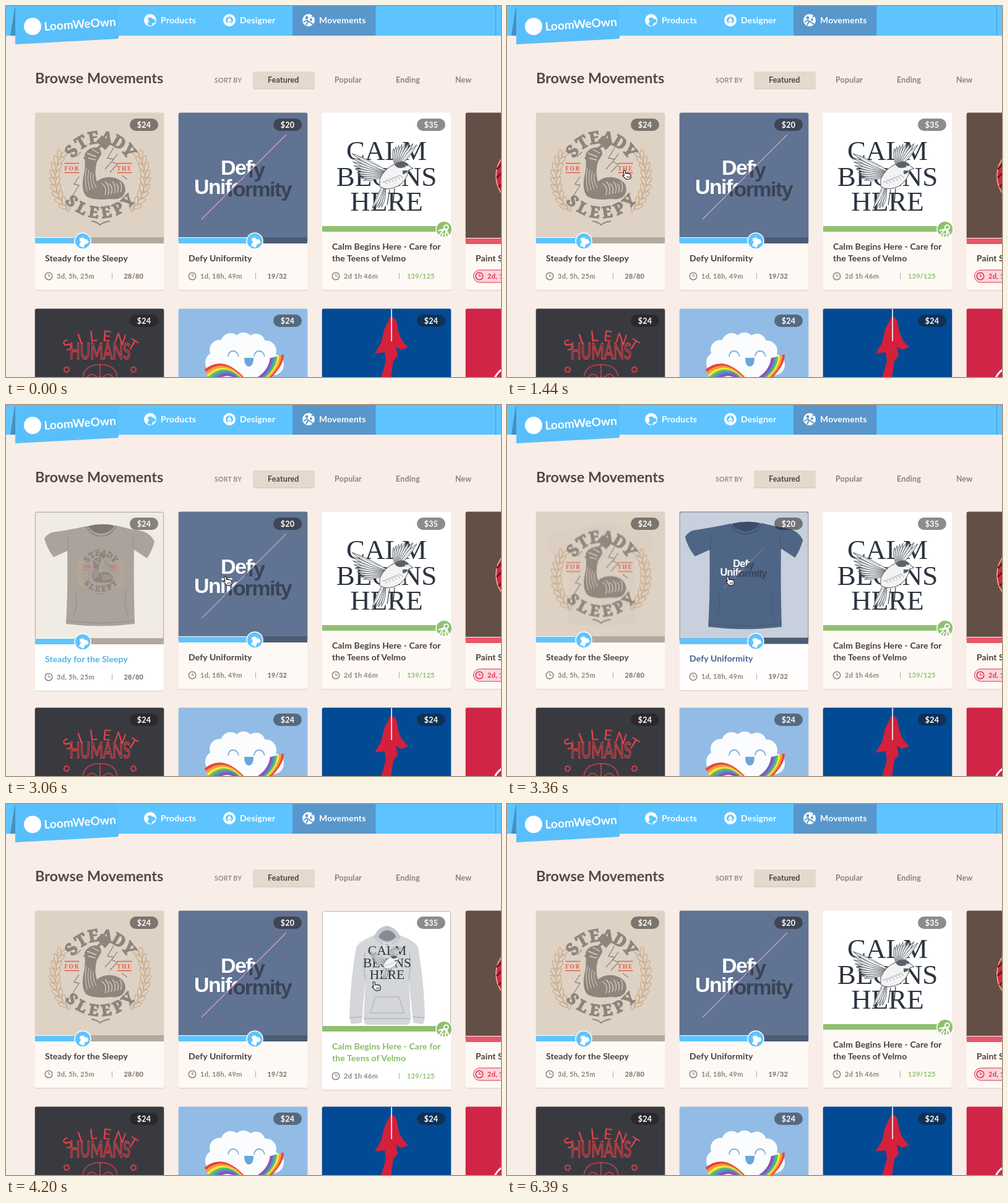
Write an HTML page that moves like this. It is 800 by 600 pixels and loops after 6.42 s.

```html
<!DOCTYPE html>
<html lang="en">
<head>
<meta charset="utf-8">
<title>Browse Movements</title>
<style>
html, body { margin: 0; width: 100%; height: 100%; overflow: hidden; background: #f8ede7; }
svg { display: block; width: 100vw; height: 100vh; }
text { font-family: Lato, "Open Sans", sans-serif; font-weight: 700; }
.sans { font-family: "Liberation Sans", sans-serif; }
.serif { font-family: "Liberation Serif", serif; font-weight: 400; }
.slab { font-family: "Noto Serif", serif; font-weight: 900; }
.thin { font-weight: 400; }
</style>
</head>
<body>
<svg id="stage" viewBox="0 0 800 600"></svg>
<script>
const LOOP = 6420;
const SHRINK = 0.52;
const SKY = '#5ec4ff';
const TAB = '#5897cb';
const GREEN = '#8fc06f';
const RED = '#dd3350';

// ---------- markup helpers ----------
const text = (x, y, str, size, fill, more = '') =>
  `<text x="${x}" y="${y}" font-size="${size}" ${fill ? `fill="${fill}"` : ''} ${more}>${str}</text>`;
const rect = (x, y, w, h, fill, more = '') =>
  `<rect x="${x}" y="${y}" width="${w}" height="${h}" fill="${fill}" ${more}/>`;
const disc = (x, y, r, fill, more = '') =>
  `<circle cx="${x}" cy="${y}" r="${r}" fill="${fill}" ${more}/>`;
const shape = (d, fill, more = '') => `<path d="${d}" fill="${fill}" ${more}/>`;
const line = (d, stroke, w = 1, more = '') =>
  `<path d="${d}" fill="none" stroke="${stroke}" stroke-width="${w}" ${more}/>`;
const at = (x, y, inner, more = '') =>
  `<g transform="translate(${x} ${y}) ${more}">${inner}</g>`;
const repeat = (n, fn) => Array.from({ length: n }, (_, i) => fn(i)).join('');
const tile = (x, y, h, fill) => rect(x - 0.3, y, 208.6, h, fill, 'rx="3"');

// letters along an arc; angles are degrees from the top, or from the bottom when dir is -1
function arcText(str, cx, cy, r, from, step, dir, size, fill, more) {
  return [...str].map((ch, i) => {
    const a = from + i * step, rad = a * Math.PI / 180;
    const x = cx + r * Math.sin(rad), y = cy - dir * r * Math.cos(rad);
    return at(x.toFixed(1), y.toFixed(1),
      text(0, size * 0.36, ch, size, fill, 'text-anchor="middle" ' + more), `rotate(${a * dir})`);
  }).join('');
}

// ---------- icons ----------
const teeIcon = fill => shape('M-7-3L-3-6Q0-4 3-6L7-3L5 1L3.5 0V7H-3.5V0L-5 1Z', fill);
const personIcon = fill => disc(0, -5, 3, 'none', `stroke="${fill}" stroke-width="1.8"`) +
  line('M-8 4L-2-1H3L8 4M-2 0L-4 9M2 0L5 9M0 4V9', fill, 2);

function clock(x, y, color) {
  return disc(x, y, 5.8, 'none', `stroke="${color}" stroke-width="1.5"`) +
    line(`M${x} ${y - 3.5}V${y}H${x + 3}`, color, 1.2);
}

function pill(x, y, price) {
  return rect(x + 153, y, 46, 20, 'rgba(30,25,25,.5)', 'rx="10"') +
    text(x + 176, y + 14.5, price, 12.5, '#fff', 'text-anchor="middle" letter-spacing=".2"');
}

// ---------- header ----------
function header() {
  const nav = (x, label) => text(x, 28, label, 14, '#fff', 'letter-spacing=".2"');
  return rect(0, 0, 800, 48, SKY) + rect(463, 0, 134.5, 48, TAB) +
    rect(791, 0, 1, 48, '#459bd0') +
    shape('M7 48L14 2H17V48Z', '#4391c3') +
    shape('M15 0H181V53L15 62Z', '#59bffa') +
    shape('M181 48H182L181 53Z', '#4391c3') +
    disc(43, 33, 14, '#fff') +
    text(62, 40, 'LoomWeOwn', 19, '#fff', 'transform="rotate(-4 62 40)"') +
    disc(233, 23, 10, '#fff') + at(234.5, 25, teeIcon(SKY), 'rotate(25)') + nav(250, 'Products') +
    disc(361, 23, 10, '#fff') + disc(361, 23, 6, SKY) +
    shape('M361 18L365 25H357ZM358 26H364V29H358Z', '#fff') + nav(378, 'Designer') +
    disc(489, 23, 10, '#fff') + disc(486, 19, 2.4, TAB) + disc(493, 22, 2, TAB) +
    line('M481 26L486 23L497 30M485 31L488 25M494 18L497 15', TAB, 2) + nav(506, 'Movements');
}

function toolbar() {
  const tab = (x, label, fill) => text(x, 124, label, 12.5, fill, 'letter-spacing=".15"');
  return text(47, 124.5, 'Browse Movements', 23.4, '#544744') +
    text(337, 124, 'SORT BY', 10.5, '#978b84', 'letter-spacing=".2"') +
    rect(399, 106, 100, 28.5, '#cdc3b7', 'rx="3"') + rect(399, 106, 100, 27.5, '#e3d9cd', 'rx="3"') +
    tab(423, 'Featured', '#4f4340') + tab(531, 'Popular', '#8e827b') +
    tab(630, 'Ending', '#8e827b') + tab(726, 'New', '#8e827b');
}

// ---------- printed designs ----------
function armArt() {
  const ink = '#8f857c', paper = '#ded2c5', wheat = '#c8aa88', red = '#e0604c';
  const heavy = `class="slab" stroke="${ink}" stroke-width="1.6"`;
  const ear = s => repeat(9, i => {
    const a = (-32 + i * 9) * Math.PI / 180;
    const x = 152 + s * 73 * Math.cos(a), y = 278 + 73 * Math.sin(a);
    return [-24, 34].map(tilt =>
      `<ellipse rx="3" ry="7.5" fill="none" stroke="${wheat}" stroke-width="1.3" transform="translate(${
        (x + (tilt > 0 ? s * 4 : -s * 4)).toFixed(1)} ${y.toFixed(1)}) rotate(${s * (tilt + a * 50)})"/>`).join('');
  });
  const sign = (x, str) => text(x, 265.5, str, 9.5, red,
      'class="slab" text-anchor="middle" letter-spacing="1.5"') +
    line(`M${x - 12} 254.5h24M${x - 12} 269.5h24`, red, 1.4);
  return ear(1) + ear(-1) +
    arcText('STEADY', 152, 272, 60, -51, 20.4, 1, 27, ink, heavy) +
    arcText('SLEEPY', 152, 270, 64, -45, 18, -1, 25, ink, heavy) +
    sign(106.5, 'FOR') + sign(191.5, 'THE') +
    line('M126 247L156 224', ink, 4) +
    shape('M146 219L155 209L169 223L160 233Z', ink) +
    shape('M127 240Q130 232 141 229Q154 227 154 240L147 252Q142 270 147 284Q158 274 176 278Q193 283 193 298Q190 315 168 312Q142 315 130 308Q121 298 125 276Q129 262 127 240Z', ink) +
    line('M131 238L146 244M133 246L145 249M139 232L150 238', paper, 1.4) +
    repeat(4, i => line(`M${130 + i * 4} ${262 + i * 3}Q${126 + i * 4} 280 ${131 + i * 5} ${300 - i * 2}`, paper, 1)) +
    repeat(6, i => line(`M${154 + i * 6} ${287 - (i % 2) * 3}Q${164 + i * 5} 292 ${160 + i * 5} ${306 - i}`, paper, 1.2)) +
    line('M174 229L164 246L174 248L160 264M180 239L171 252L180 256L168 269M118 276L110 288L118 290L108 306M187 274L196 280M113 244L121 236', ink, 1.3) +
    line('M138 348Q147 349 152 354Q158 349 168 348', ink, 2);
}

function sliceArt() {
  const words = fill => text(347, 273, 'Defy', 34, fill, 'class="sans" letter-spacing="-1.6"') +
    text(304, 304, 'Uniformity', 34, fill, 'class="sans" letter-spacing="-1.6"');
  return `<g clip-path="url(#cutLeft)">${words('#fff')}</g>` +
    `<g clip-path="url(#cutRight)">${at(3, 4, words('#3a4355'))}</g>` +
    line('M316 345L453 208', '#dc9fc6', 1.2);
}

function birdArt() {
  const ink = '#2c3540';
  const word = (y, str) => text(615, y, str, 45, ink, 'class="serif" text-anchor="middle"');
  const fan = (x, y, n, a0, step, len, grow) => repeat(n, i => {
    const l = len + i * grow;
    return at(x, y, shape(`M0 0Q${l * 0.6}-7 ${l} 0Q${l * 0.6} 4 0 0Z`, '#f6f6f6',
      'stroke="#555c65" stroke-width=".9"') + line(`M${l * 0.3} 0H${l * 0.85}`, '#8d939a', 0.7),
      `rotate(${a0 + i * step})`);
  });
  return word(249, 'CALM') + word(291, 'BEGINS') + word(331, 'HERE') +
    fan(613, 284, 4, 98, 6, 42, 2) +
    fan(632, 264, 8, -100, 7, 34, 2.4) +
    fan(622, 270, 9, 165, 5.2, 46, 3) +
    shape('M604 280Q612 262 630 255Q644 247 652 259L658 263L651 265Q648 282 634 291Q616 300 604 292Z', '#f3f3f3',
      'stroke="#4b525b" stroke-width="1"') +
    shape('M628 257Q640 246 651 257Q642 264 632 261Z', '#59616a') + disc(646, 259, 1.1, '#fff') +
    shape('M641 266L650 266Q647 272 641 272Z', '#59616a') +
    repeat(6, i => line(`M${608 + i * 5} ${285 - i * 2}q5-3 8 3`, '#8d939a', 0.9)) +
    line('M620 297L616 322M628 295L626 318', ink, 1.2);
}

// ---------- garments ----------
function tee(fill, shade) {
  return shape('M130 196Q98 203 74 206Q66 209 62 216Q66 232 77 246L99 236Q100 300 97 354Q153 361 208 354Q206 290 207 234L228 248Q236 236 240 221Q233 206 216 203Q196 200 178 195Q154 209 130 196Z', fill) +
    shape('M132 196Q154 190 176 195Q166 208 153 208Q140 207 132 196Z', shade) +
    line('M130 196Q137 212 154 212Q171 211 178 195', shade, 1.2) +
    line('M99 236Q102 222 100 212M207 234Q204 222 206 212M109 342Q118 320 112 300M198 344Q188 318 196 296M97 349Q153 356 208 349', shade, 1, 'opacity=".55"');
}

function hoodie() {
  const seam = '#a5a9b0';
  return shape('M596 212Q570 222 566 232Q556 290 555 345L558 356L575 354Q577 320 581 285L578 345Q578 357 584 357H648Q655 356 654 345L651 285Q655 320 658 354L674 356L677 345Q676 290 666 232Q662 222 636 212Q630 200 616 197Q602 199 596 212Z', '#d4d6d9') +
    shape('M595 214Q602 199 616 197Q630 200 637 214Q628 222 616 224Q604 222 595 214Z', '#c2c5ca') +
    shape('M602 215Q606 205 616 204Q627 205 630 215Q623 222 616 222Q608 221 602 215Z', '#858a94') +
    line('M595 215Q604 227 616 228Q628 227 637 215M581 285Q577 260 580 240M651 285Q655 260 652 240', seam) +
    line('M597 312H635L643 338H589ZM578 347H654M556 346L576 344M657 344L676 346', seam) +
    line('M611 224V240M621 224V238', '#eceef0', 1.5);
}

// ---------- cards ----------
const cards = [
  { x: 47, price: '$24', bg: '#ded2c5', lit: '#f0ece4', bar: 375, done: 63, knob: 77, color: SKY, icon: teeIcon,
    hot: [80, 180, 228], title: ['Steady for the Sleepy'], left: '3d, 5h, 25m', count: '28/80', countX: 143.5,
    art: armArt, cx: 152, cy: 275, dx: 1, dy: -6, wear: () => tee('#aaa39c', '#7f7872') },
  { x: 279, price: '$20', bg: '#607392', lit: '#e3e9f0', bar: 375, done: 110, knob: 123, color: SKY, icon: teeIcon,
    hot: [66, 98, 146], title: ['Defy Uniformity'], left: '1d, 18h, 49m', count: '19/32', countX: 143.5,
    art: sliceArt, cx: 382, cy: 278, dx: 0, dy: -14,
    wear: () => `<g transform="translate(383 190) scale(1.07 1.055) translate(-151 -194)">${tee('#4f6586', '#3a4d6b')}</g>` },
  { x: 511, price: '$35', bg: '#ffffff', lit: '#ffffff', bar: 356, done: 208, knob: 197, color: GREEN, icon: personIcon,
    hot: [134, 188, 100], title: ['Calm Begins Here - Care for', 'the Teens of Velmo'],
    left: '2d 1h 46m', count: '139/125', countX: 137, countColor: GREEN,
    art: birdArt, cx: 615, cy: 274, dx: 1, dy: -18, wear: hoodie }
];

function meta(c) {
  return clock(c.x + 22, 437, '#8e837d') +
    text(c.x + 35, 441, c.left, 11, '#8e837d', 'letter-spacing=".3"') +
    rect(c.x + 124, 432, 1, 10, '#b5aaa3') +
    text(c.x + c.countX, 441, c.count, 11, c.countColor || '#756a65', 'letter-spacing=".2"');
}

function footer(c, extra) {
  const end = c.bar + 9;
  return rect(c.x, end - 4, 208, 464.5 - end, '#e5d8cf', 'rx="3"') +
    rect(c.x, end - 4, 208, 463 - end, '#fef9f4', 'rx="3" class="panel"') +
    rect(c.x, c.bar - 1, 208, 10, c.bg) + rect(c.x, c.bar - 1, 208, 10, 'rgba(0,0,0,.2)') +
    rect(c.x, c.bar - 1, c.done, 1, '#fff') + rect(c.x, c.bar, c.done, 9, c.color) + extra;
}

function card(c, i) {
  const first = 432 - 19 * c.title.length;
  const title = c.title.map((s, n) => text(c.x + 16, first + n * 19, s, 14, '', 'letter-spacing=".1"')).join('');
  const knob = at(c.x + c.knob, c.bar + 5,
    disc(0, 0, 13, c.color, 'stroke="#fff" stroke-width="1.5"') +
    `<g transform="translate(1 2) rotate(25) scale(1.15)">${c.icon('#fff')}</g>`);
  const small = `translate(${c.cx + c.dx} ${c.cy + c.dy}) scale(${1 - SHRINK}) translate(${-c.cx} ${-c.cy})`;
  return `<g id="card${i}">` +
    tile(c.x, 172.6, 210, c.bg) +
    `<g class="lit">${rect(c.x + 0.5, 173.5, 207, 212, c.lit, 'rx="3" stroke="#b5b0aa"')}</g>` +
    `<g class="wear">${c.wear()}<g transform="${small}">${c.art()}</g></g>` +
    `<g class="art">${c.art()}</g>` +
    `<g class="foot">${footer(c, knob + `<g class="title">${title}</g>` + meta(c))}</g>` +
    pill(c.x, 182, c.price) + '</g>';
}

function edgeCard() {
  const c = { x: 743, bg: '#644f47', bar: 376, done: 208, color: '#ea5568' };
  return tile(743, 172.6, 210, c.bg) +
    disc(840, 275, 48, '#d72640', 'stroke="#f3b6ac" stroke-width="1.5"') +
    line('M793 264L801 256M793 278L801 270M796 293L801 288', '#5c1c2b', 3) +
    footer(c, text(759, 413, 'Paint Skies', 14, '#4a3f3c', 'letter-spacing=".1"') +
      rect(755.5, 427, 120, 20, '#fbd6da', `rx="10" stroke="${RED}"`) +
      clock(765, 437, RED) + text(778, 441, '2d, 1h', 11, RED, 'letter-spacing=".3"'));
}

// ---------- second row ----------
function lowerRow() {
  const base = (x, fill) => tile(x, 489.6, 120, fill);
  const red = '#e8434a';
  const dotted = 'stroke-dasharray="2.5 1"';
  const skull = arcText('SILENT', 152, 634, 101, -31.5, 12.6, 1, 24, red, 'class="thin"') +
    `<g transform="translate(152 571) scale(.62 1)">${text(0, 0, 'HUMANS', 36, 'none',
      `class="thin" text-anchor="middle" stroke="${red}" stroke-width="1.6"`)}</g>` +
    line('M124 602Q126 580 152 580Q178 580 180 602M131 601Q138 590 147 601M157 601Q166 590 173 601M152 580V600', red, 1.8, dotted) +
    disc(98, 588, 4, 'none', `stroke="${red}" stroke-width="2.5" ${dotted}`) +
    disc(206, 588, 4, 'none', `stroke="${red}" stroke-width="2.5" ${dotted}`);

  const puffs = [[340, 577, 18], [345, 556, 16], [363, 545, 16], [384, 544, 16], [404, 545, 15], [420, 558, 17], [432, 580, 17], [386, 584, 42]];
  const bands = ['#e8413f', '#f59a33', '#f8e24a', '#63bd54', '#4a8fdc', '#8a55b4'];
  const cloud = puffs.map(p => disc(...p, '#fbfcfd')).join('') +
    line('M359 567Q360 558 367 558Q374 558 376 567M401 567Q402 558 409 558Q416 558 418 567', '#7fb0de', 1.8) +
    shape('M385 569H400Q400 583 392 583Q385 582 385 569Z', '#6aa5dd') +
    bands.map((b, i) => line(`M${322 + i * 2} ${590 + i * 4}Q${350 + i} ${566 + i * 4} ${384 - i * 2} 603`, b, 4.5) +
      line(`M${447 - i * 3.6} ${564 + i}Q${446 - i * 4} ${584 + i * 2} ${420 - i * 4} 606`, b, 4.2)).join('');

  const drape = shape('M621 503Q630 502 632 514Q634 532 641 542L650 552L638 556L630 551L633 566L626 574L622 602H606L614 574L612 560L596 562L606 545L611 524Z', '#d5203b') +
    rect(622.3, 490, 1.6, 52, '#fff');

  return base(47, '#393a40') + skull + pill(47, 499, '$24') +
    base(279, '#92bce5') + cloud + pill(279, 499, '$24') +
    base(511, '#034a94') + drape + pill(511, 499, '$24') +
    base(743, '#d12548') + disc(816, 612, 28, 'none', 'stroke="#fff" stroke-width="3"');
}

const hand = shape('M-4-6Q-2.5-8-1-6V-1.5Q1-2.5 2-1Q4-1.5 4.5 0Q6-.5 6.5 1.5V4Q6.5 7 4.5 8H-1.5Q-3 6-4.5 4L-6.5 1Q-6-1-4 1Z',
  '#fff', 'stroke="#222" stroke-width="1.2" stroke-linejoin="round"') + line('M0 3V6M2 3V6M4 3V6', '#222', .8);

const stage = document.getElementById('stage');
stage.innerHTML = `<defs>
  <clipPath id="cutLeft"><path d="M270 170H491L270 391Z"/></clipPath>
  <clipPath id="cutRight"><path d="M491 170L270 391H491Z"/></clipPath></defs>` +
  rect(0, 0, 800, 600, '#f8ede7') + header() + toolbar() + cards.map(card).join('') +
  edgeCard() + lowerRow() + `<g id="cursor"><g transform="rotate(-10)">${hand}</g></g>`;

// ---------- motion ----------
const ramp = (t, a, b) => Math.min(1, Math.max(0, (t - a) / (b - a)));
const smooth = u => u * u * (3 - 2 * u);
const easeIn = u => u * u;
const easeOut = u => 1 - (1 - u) * (1 - u);
const easeBoth = u => u < 0.5 ? 4 * u ** 3 : 1 - 4 * (1 - u) ** 3;

// when each card starts to light up and to fade back
const hovers = [[1500, 3090], [3150, 3770], [3900, 5370]];
// cursor moves: from, to, x, y, easing
const moves = [
  [840, 1470, 193, 273, easeOut],
  [2040, 2610, 203, 280, easeBoth],
  [2850, 3090, 360, 284, easeOut],
  [3540, 3930, 592, 297, easeBoth],
  [3930, 4110, 598, 294, easeOut],
  [4680, 5310, 575, -20, easeIn]
];

const parts = cards.map((c, i) => {
  const find = name => document.querySelector(`#card${i} .${name}`);
  return { lit: find('lit'), wear: find('wear'), art: find('art'), foot: find('foot'), title: find('title'), panel: find('panel') };
});
const cursor = document.getElementById('cursor');
const mix = (a, b, k) => `rgb(${a.map((v, i) => Math.round(v + (b[i] - v) * k))})`;

function draw(t) {
  cards.forEach((c, i) => {
    const [on, off] = hovers[i], el = parts[i];
    const p = smooth(ramp(t, on, on + 300)) - smooth(ramp(t, off, off + 300));
    el.lit.setAttribute('opacity', p);
    el.wear.setAttribute('opacity', Math.min(1, p * 2));
    el.art.setAttribute('opacity', Math.max(0, 1 - 1.6 * p));
    el.art.setAttribute('transform',
      `translate(${c.cx + c.dx * p} ${c.cy + c.dy * p}) scale(${1 - SHRINK * p}) translate(${-c.cx} ${-c.cy})`);
    el.foot.setAttribute('transform', `translate(0 ${3 * p})`);
    el.title.setAttribute('fill', mix([74, 63, 60], c.hot, Math.min(1, p * 1.6)));
    el.panel.setAttribute('fill', mix([254, 249, 244], [255, 255, 255], p));
  });
  let x = 250, y = -20;
  for (const [a, b, tx, ty, ease] of moves) {
    const k = ease(ramp(t, a, b));
    x += (tx - x) * k;
    y += (ty - y) * k;
  }
  cursor.setAttribute('transform', `translate(${x.toFixed(2)} ${y.toFixed(2)})`);
}

const start = performance.now();
function tick(now) {
  draw(Math.max(0, now - start) % LOOP);
  requestAnimationFrame(tick);
}
draw(0);
requestAnimationFrame(tick);
</script>
</body>
</html>
```
